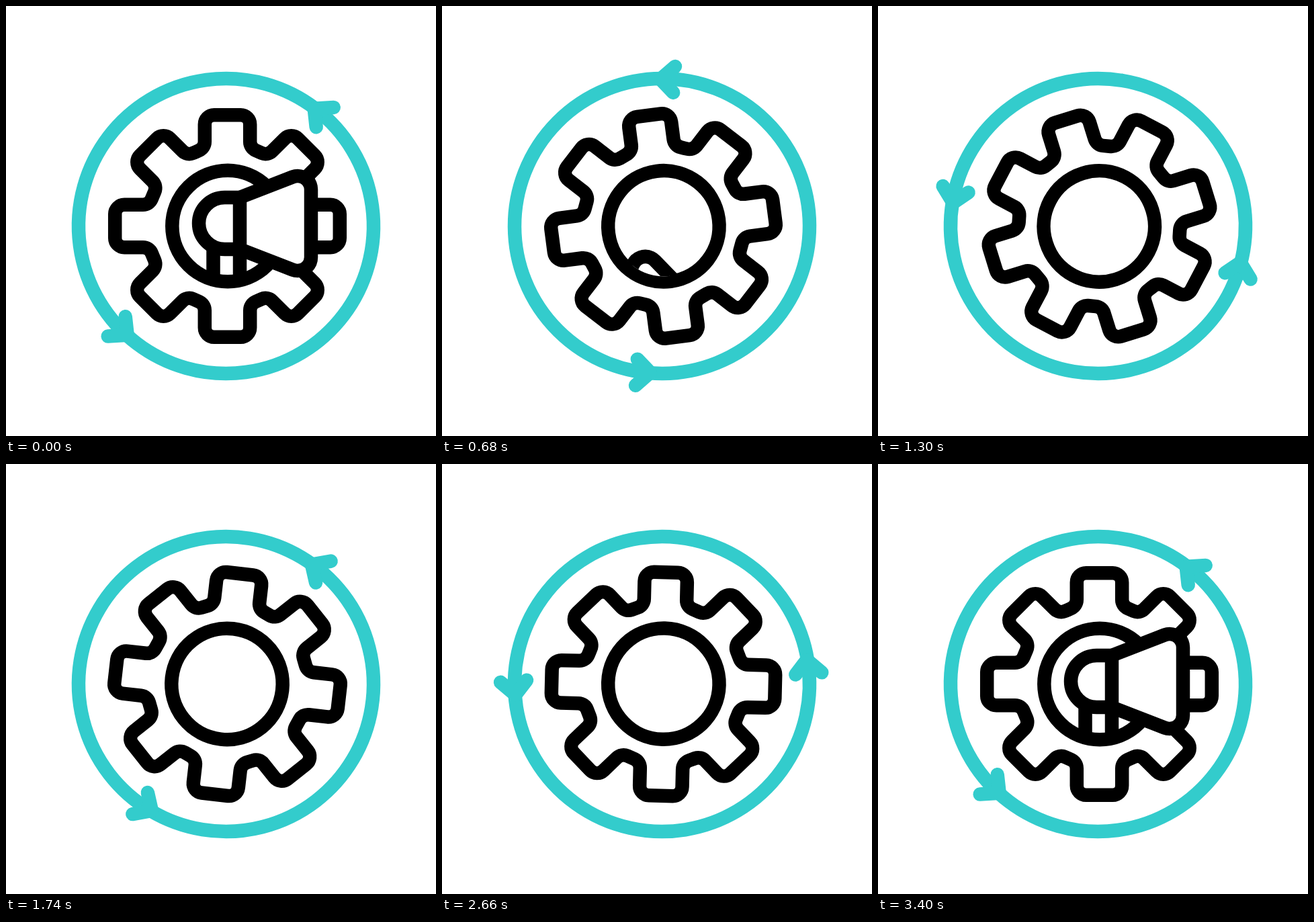
An HTML page with a canvas that plays this animation: 640x640 px, repeating every 3.62 s.

```html
<!DOCTYPE html>
<html lang="en">
<head>
<meta charset="utf-8">
<title>Marketing gear</title>
<style>
html, body { margin: 0; width: 100%; height: 100%; overflow: hidden; background: #fff; }
canvas { display: block; width: 640px; height: 640px; }
</style>
</head>
<body>
<canvas id="stage" width="640" height="640"></canvas>
<script>
const LOOP = 3620, RUN = 3400;
const TEAL = '#33cccc', BLACK = '#000', WEIGHT = 20.5;
const ctx = document.getElementById('stage').getContext('2d');
const rad = d => d * Math.PI / 180;

// Smooth 0..1 ramp between times a and b
function ramp(t, a, b) {
  const s = Math.min(1, Math.max(0, (t - a) / (b - a)));
  return s * s * (3 - 2 * s);
}

function group(x, y, deg, draw) {
  ctx.save();
  ctx.translate(x, y);
  ctx.rotate(rad(deg));
  draw();
  ctx.restore();
}

function line(...pts) {
  ctx.beginPath();
  pts.forEach(([x, y]) => ctx.lineTo(x, y));
  ctx.stroke();
}

function circle(x, y, r) {
  ctx.beginPath();
  ctx.arc(x, y, r, 0, 2 * Math.PI);
  ctx.stroke();
}

function roundPath(pts, r) {
  const n = pts.length, a = pts[n - 1], b = pts[0];
  const path = new Path2D();
  path.moveTo((a[0] + b[0]) / 2, (a[1] + b[1]) / 2);
  pts.forEach((p, i) => path.arcTo(...p, ...pts[(i + 1) % n], r));
  path.closePath();
  return path;
}

// Eight teeth; the upright pair is a little wider and shorter
function gearPath() {
  const pts = [];
  for (let i = 0; i < 8; i++) {
    const a = rad(i * 45), c = Math.cos(a), s = Math.sin(a), k = Math.cos(2 * a);
    const w = 31.7 + 2 * Math.max(0, k), tip = 166.3 - k, root = 116.3;
    for (const [x, y] of [[-w, -root], [-w, -tip], [w, -tip], [w, -root]])
      pts.push([x * c - y * s, x * s + y * c]);
  }
  return roundPath(pts, 14);
}
const gear = gearPath();

function drawArrows(e) {
  ctx.strokeStyle = TEAL;
  group(327.5, 327.5, 37.3 - 360 * e, () => {
    circle(0, 0, 219.5);
    const tip = () => line([20.5, -237.5], [-1.5, -218.5], [17.5, -198.5]);
    tip();
    group(-20, -0.5, 180, tip);
  });
}

function drawGear(e) {
  ctx.strokeStyle = BLACK;
  group(329.5, 327.5, 360 * e, () => {
    ctx.stroke(gear);
    circle(0.5, 0, 82.7);
  });
}

// Short strokes that shoot out of the horn
function drawSound(t) {
  const head = ramp(t, 3060, 3300), tail = ramp(t, 3160, 3390);
  if (head <= tail) return;
  for (const k of [-1, 0, 1]) {
    const at = f => [510 + f * (k ? 96 : 118), 323.5 + k * (52 + 44 * f)];
    line(at(tail), at(head));
  }
}

function drawHorn(t) {
  const k = Math.min(t, RUN - t);
  const turn = -125 * ramp(k, 0, 1700), drop = ramp(k, 340, 1020);
  if (drop === 1) return;
  ctx.save();
  // Visible above the gear and inside its hole
  ctx.beginPath();
  ctx.rect(0, 0, 640, 327.5);
  ctx.rect(345, 300, 295, 106);
  ctx.moveTo(405, 327.5);
  ctx.arc(330, 327.5, 75, 0, 2 * Math.PI);
  ctx.clip();
  group(330 - 23 * drop, 403 + 310 * drop, turn, () => {
    ctx.translate(-330, -403);
    ctx.fillStyle = '#fff';
    ctx.lineCap = 'butt';
    line([308.5, 358], [308.5, 430]);
    line([348, 285], [348, 430]);
    ctx.beginPath();
    ctx.moveTo(348, 285);
    ctx.lineTo(325.5, 285);
    ctx.arc(325.5, 323.5, 38.5, -Math.PI / 2, Math.PI / 2, true);
    ctx.lineTo(348, 362);
    ctx.fill();
    ctx.stroke();
    ctx.beginPath();
    ctx.moveTo(348, 285);
    ctx.arc(434, 273, 20, rad(-111.2), 0);
    ctx.arc(434, 374, 20, 0, rad(111.2));
    ctx.lineTo(348, 362);
    ctx.closePath();
    ctx.fill();
    ctx.stroke();
  });
  ctx.restore();
}

function render(t) {
  const e = ramp(t, 0, RUN);
  ctx.fillStyle = '#fff';
  ctx.fillRect(0, 0, 640, 640);
  ctx.lineWidth = WEIGHT;
  ctx.lineCap = ctx.lineJoin = 'round';
  drawArrows(e);
  drawGear(e);
  drawSound(t);
  drawHorn(t);
}

const start = performance.now();
function tick() {
  render(Math.min(RUN, (performance.now() - start) % LOOP));
  requestAnimationFrame(tick);
}
tick();
</script>
</body>
</html>
```
